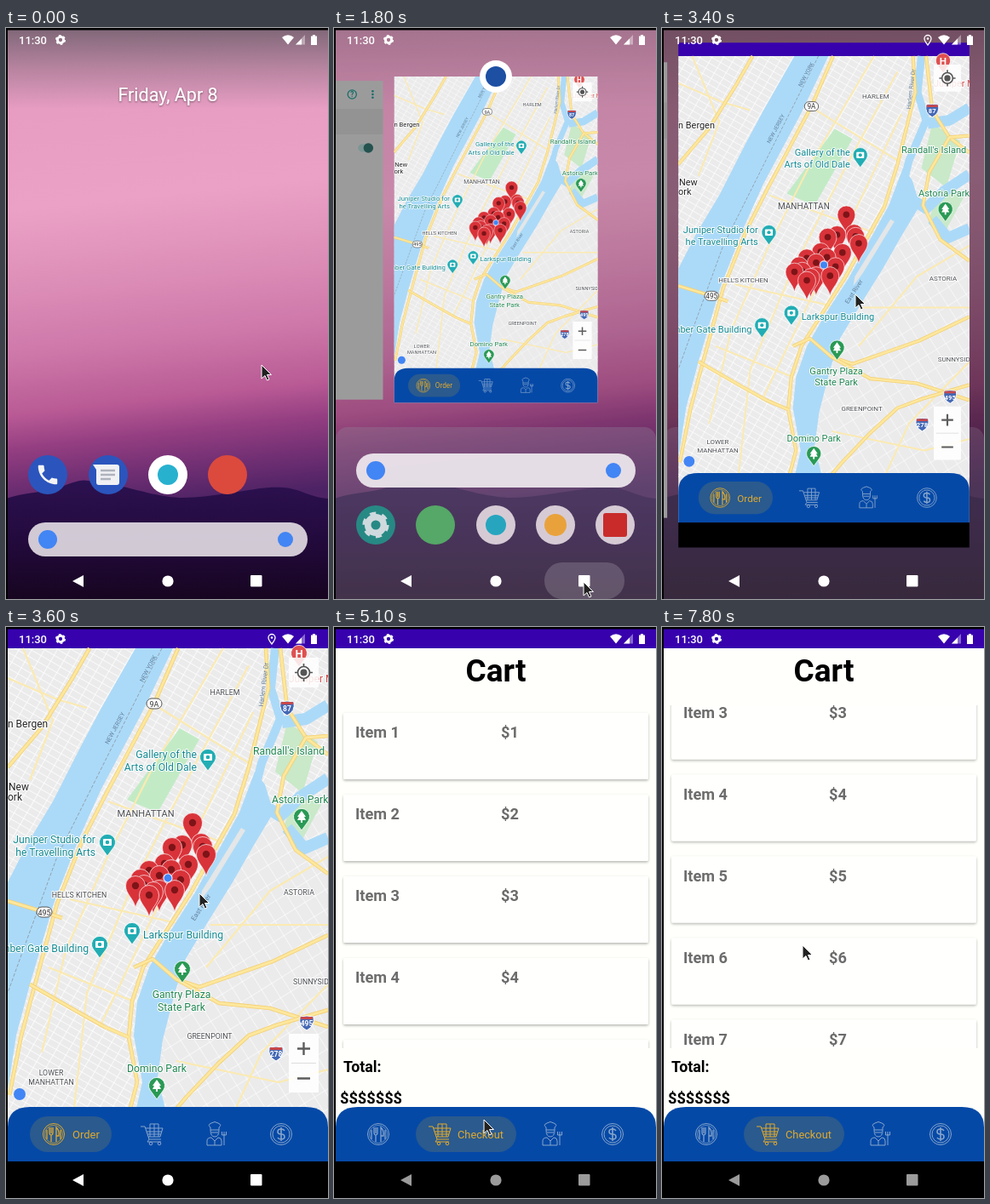
An HTML page for the animation above (8 s loop, 378 by 671 pixels).

```html
<!DOCTYPE html>
<html lang="en">
<head>
<meta charset="utf-8">
<title>Phone demo</title>
<style>
html, body { margin: 0; width: 100%; height: 100%; overflow: hidden; background: #000; }
svg { display: block; width: 100vw; height: 100vh; }
text { font-family: Roboto, sans-serif; }
.b { font-weight: 700; }
.halo text { paint-order: stroke; stroke: #fff; stroke-width: 2px; stroke-linejoin: round; }
</style>
</head>
<body>
<svg id="stage" viewBox="0 0 378 671" xmlns="http://www.w3.org/2000/svg"></svg>
<script>
const LOOP = 8000, STEP = 100;
const GOLD = '#e0a92e', PALE = '#86a5cb';

const rect = (x, y, w, h, fill, r = 0, more = '') =>
  `<rect x="${x}" y="${y}" width="${w}" height="${h}" rx="${r}" fill="${fill}" ${more}/>`;
const circle = (x, y, r, fill, more = '') =>
  `<circle cx="${x}" cy="${y}" r="${r}" fill="${fill}" ${more}/>`;
const path = (d, fill, more = '') => `<path d="${d}" fill="${fill}" ${more}/>`;
const line = (d, color, w, more = '') =>
  path(d, 'none', `stroke="${color}" stroke-width="${w}" stroke-linejoin="round" ${more}`);
const text = (x, y, s, size, fill, more = '') =>
  `<text x="${x}" y="${y}" font-size="${size}" fill="${fill}" ${more}>${s}</text>`;
const group = (id, body, more = '') => `<g id="${id}" ${more}>${body}</g>`;
const mid = 'text-anchor="middle"', end = 'text-anchor="end"';

const gear = (x, y, r, c) =>
  circle(x, y, r * .62, 'none', `stroke="${c}" stroke-width="${r * .5}"`) +
  circle(x, y, r * .9, 'none', `stroke="${c}" stroke-width="${r * .28}" stroke-dasharray="${r * .47}"`);

// Home screen
const phone = 'M6.6 10.8c1.4 2.8 3.8 5.1 6.6 6.6l2.2-2.2c.3-.3.7-.4 1-.2 1.1.4 2.3.6 3.6.6.6 0 1 .4 1 1V20c0 .6-.4 1-1 1C10.6 21 3 13.4 3 4c0-.6.4-1 1-1h3.5c.6 0 1 .4 1 1 0 1.2.2 2.4.6 3.6.1.3 0 .7-.3 1z';
const wallpaper = rect(0, 0, 378, 671, 'url(#sky)') +
  path('M0 553C20 546 45 546 65 539S90 529 103 534S130 537 142 540S185 552 208 552S250 548 272 545S305 539 325 540S355 551 378 553V671H0Z', 'url(#hill)') +
  rect(0, 0, 378, 95, 'url(#scrimFill)', 0, 'id="scrim"');
const dockIcons =
  circle(49, 525, 23, '#2b55bd') +
  path(phone, '#f4f4f6', 'transform="translate(34 510) scale(1.25)"') +
  circle(120, 525, 23, '#2b55bd') +
  path('M102 513H130Q133 513 133 516V534Q133 537 130 537H109Q106 537 106 534V519Z', '#f1f1f4') +
  line('M111 520H128M111 525H128M111 530H123', '#aeb2bd', 2.6) +
  circle(190, 525, 23, '#fff') + circle(190, 525, 12, '#27b1cf') +
  circle(260, 525, 23, '#db4a3d');
const searchBar = rect(26, 581, 328, 40, '#eee9ee', 20, 'id="searchFill"') +
  circle(49, 601, 11, '#4285f4') + circle(328, 601, 9, '#4285f4');
const appRow =
  circle(49, 584, 23, '#278984') + gear(49, 584, 15, '#cfdade') +
  circle(119, 584, 23, '#55a867') +
  circle(190, 584, 23, '#d6cbd5') + circle(190, 584, 12, '#27a5bf') +
  circle(260, 584, 23, '#d6cbd5') + circle(260, 584, 13, '#e9a23b') +
  circle(330, 584, 23, '#d6cbd5') + rect(316, 570, 28, 28, '#c92b2b', 3);

// Neighbouring task, drawn to the left of its own right edge
const settings = rect(-376, 8, 376, 589, '#9c9b9c') +
  rect(-376, 60, 376, 47, '#949394') +
  circle(-57, 33, 8, 'none', 'stroke="#176d68" stroke-width="2"') +
  text(-57, 38, '?', 13, '#176d68', mid + ' class="b"') +
  [27, 33, 39].map(y => circle(-19, y, 2, '#176d68')).join('') +
  rect(-46, 125, 25, 14, '#7b9694', 7) + circle(-27, 132, 9, '#24524f');

// Map
const hudson = 'M152 25L112 95L88 140L55 205L25 255L2 300V545L12 480L28 420L56 325L85 250L112 190L160 100L196 25Z';
const east = 'M292 170L274 218L248 265L222 312L190 362L168 400L154 440L150 480L160 535L152 570H188L178 530L184 485L198 430L211 390L238 345L266 300L290 258L314 218L304 185Z';
const queens = 'M314 218L238 345L198 430L184 485L188 570H378V190Z';
const highways = [
  'M202 25L174 90L118 195L90 250L60 325L34 420L18 480L4 550',
  'M305 25L308 72L285 165L268 220L243 265L217 312L185 362L161 400L148 440L144 482L154 535L146 565',
  'M150 400L172 390L200 414L227 423L270 408L313 393L378 362',
  'M200 414L250 442L310 448L378 470',
  'M200 566L212 552L250 512L285 480L317 468L378 450',
  'M322 25L330 95L352 130L378 150',
  'M378 128L352 130L326 175L318 218L340 262L378 290',
  'M2 322L45 335L66 342',
  'M2 165L42 118L78 60L98 25',
  'M28 420L82 451L116 470L144 482'
];
const streets = [
  'M255 25L175 160L120 268L70 380L42 500', 'M285 45L220 165L150 300L95 430L80 565',
  'M290 100L235 215L170 345L110 470', 'M180 95L285 160', 'M120 205L260 255',
  'M75 320L210 350', 'M50 400L150 440', 'M240 350L378 350', 'M235 400L310 310L378 270',
  'M270 565L300 500L378 420', 'M2 60L60 85L95 95', 'M20 25L55 110L28 180', 'M200 510L320 535L378 520'
];
const marker = (x, y, c, glyph) =>
  path(`M${x} ${y + 16}L${x - 8} ${y + 5}A9.5 9.5 0 1 1 ${x + 8} ${y + 5}Z`, c, 'stroke="#fff" stroke-width=".8"') + glyph;
const tree = (x, y) => marker(x, y, '#2a9a55',
  path(`M${x} ${y - 7}L${x + 5} ${y}H${x + 3}L${x + 5} ${y + 4}H${x - 5}L${x - 3} ${y}H${x - 5}Z`, '#fff') + rect(x - 1, y + 3, 2, 4, '#fff'));
const camera = (x, y) => marker(x, y, '#22adb4',
  rect(x - 5, y - 4, 10, 8, '#fff', 1) + circle(x, y, 2.3, '#22adb4'));
const pin = ([x, y]) =>
  path(`M${x} ${y + 26}C${x - 2} ${y + 15} ${x - 11.5} ${y + 10} ${x - 11.5} ${y}A11.5 11.5 0 0 1 ${x + 11.5} ${y}C${x + 11.5} ${y + 10} ${x + 2} ${y + 15} ${x} ${y + 26}Z`,
    '#d9333a', 'stroke="#fff" stroke-opacity=".75" stroke-width=".9"') + circle(x, y, 4.2, '#7d1418');
const pins = [[219, 230], [229, 254], [207, 256], [195, 259], [231, 258], [235, 267], [214, 279], [186, 278], [194, 285],
  [168, 286], [180, 292], [158, 296], [205, 297], [162, 303], [152, 304], [180, 309], [198, 309], [173, 311], [168, 315]];
const shield = (x, y, n) =>
  path(`M${x - 8} ${y - 7}Q${x} ${y - 9} ${x + 8} ${y - 7}Q${x + 10} ${y + 4} ${x} ${y + 9}Q${x - 10} ${y + 4} ${x - 8} ${y - 7}Z`, '#4468b5', 'stroke="#fff"') +
  rect(x - 7, y - 7, 14, 3, '#c9474a') + text(x, y + 4, n, 8.5, '#fff', mid + ' class="b"');
const oval = (x, y, n) => rect(x - 9, y - 6, 18, 12, '#fff', 6, 'stroke="#555"') + text(x, y + 3.5, n, 9, '#333', mid);
const tag = (rows, color) => rows.map(([x, y, s, size, more = '']) => text(x, y, s, size, color, more)).join('');
const turn = (x, y, a) => `${mid} transform="rotate(${a} ${x} ${y})"`;

const map = rect(2, 25, 376, 603, '#ebebec') + rect(2, 25, 376, 545, 'url(#blocks)') +
  path(queens, '#ebebec') + path(queens, 'url(#blocks2)') +
  path('M204 119L227 132L178 218L142 203Z', '#c2ebc5') +
  path('M340 195L372 205L345 255L325 238ZM330 112L366 135L348 195L316 170Z', '#c9e9c9') +
  streets.map(d => line(d, '#fbeab1', 2.2)).join('') +
  path(hudson, '#abdaf8') + path(east, '#abdaf8') +
  line('M316 25L311 72L322 108L300 160L290 200', '#abdaf8', 10) +
  line('M288 200L322 222L345 200L378 178', '#abdaf8', 14) +
  line('M378 92L352 108L324 112M378 248L350 260L330 236', '#abdaf8', 14) +
  path('M276 236L281 239L240 306L228 322L230 310Z', '#e4e6e7') +
  highways.map(d => line(d, '#f3cf72', 4.6) + line(d, '#fde79d', 3)).join('') +
  line('M183 25L120 150L60 270L20 380L2 430', '#8e9aa5', .9, 'stroke-dasharray="4 2"') +
  oval(174, 90, '9A') + oval(45, 335, '495') +
  shield(330, 95, '87') + shield(353, 465, '495') + shield(317, 501, '278') +
  group('labels',
    tag([[224, 154, 'Gallery of the', 12.2, end], [224, 169, 'Arts of Old Dale', 12.2, end],
      [105, 254, 'Juniper Studio for', 12.2, end], [105, 269, 'he Travelling Arts', 12.2, end],
      [161, 366, 'Larkspur Building', 12.2], [97, 382, 'mber Gate Building', 12.2, end]], '#128991') +
    tag([[206, 436, 'Gantry Plaza', 12.2, mid], [206, 451, 'State Park', 12.2, mid], [177, 523, 'Domino Park', 12.2, mid],
      [290, 150, "Randall's Island", 12.2], [312, 207, 'Astoria Park', 12.2]], '#1f8550') +
    tag([[164, 223, 'MANHATTAN', 11, mid], [257, 80, 'HARLEM', 8.8, mid], [344, 315, 'ASTORIA', 8.8, mid],
      [337, 420, 'SUNNYSIDE', 8.8], [239, 484, 'GREENPOINT', 8.8, mid], [86, 318, "HELL'S KITCHEN", 8.8, mid],
      [53, 527, 'LOWER', 8.8, mid], [53, 538, 'MANHATTAN', 8.8, mid]], '#4a4c50') +
    tag([[2, 118, 'n Bergen', 12], [3, 192, 'New', 12], [2, 204, 'ork', 12]], '#222') +
    tag([[332, 65, 'Juniper M', 12]], '#cf4848'), 'class="halo"') +
  tag([[169, 50, 'NEW YORK', 7, turn(169, 50, -62)], [130, 120, 'NEW JERSEY', 7, turn(130, 120, -62)],
    [305, 68, 'Harlem River Dr', 7.5, turn(305, 68, -83)], [231, 331, 'East River', 8, turn(231, 331, -57)]], '#627f9b') +
  marker(344, 31, '#df5050', text(344, 36, 'H', 13, '#fff', mid + ' class="b"')) +
  camera(119, 253) + camera(237, 153) + camera(148, 357) + camera(110, 373) +
  tree(207, 402) + tree(177, 539) + tree(347, 223) +
  pins.map(pin).join('') + circle(190, 295, 5, '#4285f4', 'stroke="#dfeaff" stroke-width="1.2"') +
  circle(16, 549, 7, '#4285f4') +
  rect(332, 36, 35, 35, '#fff', 1, 'opacity=".85"') +
  circle(349.5, 53.5, 7, 'none', 'stroke="#555" stroke-width="1.7"') + circle(349.5, 53.5, 4, '#555') +
  line('M349.5 43V47M349.5 60V64M339 53.5H343M356 53.5H360', '#555', 1.7) +
  rect(332, 478, 35, 69, '#fff', 1, 'opacity=".9"') + line('M335 512.5H364', '#ddd', 1) +
  line('M342 495.5H357M349.5 488V503M342 530.5H357', '#5c5c5c', 2.4);

// Cart page
const card = n => {
  const y = 101 + (n - 1) * 96;
  return rect(11, y, 358, 78, '#fffffd', 2, 'filter="url(#lift)"') +
    text(25, y + 29, 'Item ' + n, 18.2, '#6c6c6c', 'class="b"') + text(196, y + 29, '$' + n, 18.2, '#6c6c6c', 'class="b"');
};
const cart = rect(2, 25, 376, 603, '#fffffb') +
  text(190, 64, 'Cart', 37, '#000', mid + ' class="b"') +
  `<g clip-path="url(#listClip)">${group('list', [1, 2, 3, 4, 5, 6, 7, 8].map(card).join(''))}</g>` +
  text(11, 523, 'Total:', 17.8, '#000', 'class="b"') +
  `<g clip-path="url(#sumClip)">${text(7, 560, '$$$$$$$', 18.2, '#000', 'class="b"')}</g>`;

// Tab icons, centred on the origin
const icons = [
  circle(0, 0, 12.5, 'none') + circle(0, 0, 10.5, 'none', 'stroke-width=".7"') +
    path('M-5 -8V-2Q-5 1 -3 1V9M-1 -8V-2Q-1 1 -3 1M-3 -8V-1M3 9V-8Q7 -4 6 2H3M8 -5V6M-8 -5V6', 'none', 'stroke-width="1.3"'),
  path('M-14 -9H-9L-4 6H10M-8 -7H12L9 3H-5M-7 -3H11M-6 0H10M-3 -12V3M2 -12V3M7 -12V3M-3 -12H7M-4 6L-6 9H10', 'none') +
    circle(-2, 11, 1.8, 'none') + circle(8, 11, 1.8, 'none'),
  path('M-7 -5V-8Q-11 -11 -6 -13Q-2 -16 2 -13Q7 -11 3 -8V-5ZM-7 -5Q-7 3 -2 3Q3 3 3 -5M-6 -2H2M-11 13V8Q-11 4 -6 4L-2 8L2 4Q6 4 6 8V13ZM-2 8V13M9 13V0M6.5 -3V1H11.5V-3M9 -3V1', 'none'),
  circle(0, 0, 12.5, 'none') + circle(0, 0, 10, 'none') +
    path('M4 -4Q3 -6 0 -6Q-4 -6 -4 -3Q-4 0 0 0Q4 0 4 3Q4 6 0 6Q-3 6 -4 4M0 -8V8', 'none', 'stroke-width="1.6"')
];
const tabs = path('M2 628V588Q2 564 28 564H352Q378 564 378 588V628Z', '#0549a7') +
  group('orderPill', rect(28, 575, 96, 42, '#2a5a8e', 21) + text(78, 601, 'Order', 13, GOLD)) +
  group('checkPill', rect(96, 575, 118, 42, '#2a5a8e', 21) + text(145, 601, 'Checkout', 12.8, GOLD)) +
  icons.map((d, i) => group('tab' + i, d, 'stroke-width="1"')).join('');

const task = group('taskBody',
  rect(2, 2, 376, 23, '#3702ad') + group('map', map) + group('cart', cart) + tabs + rect(2, 628, 376, 43, '#000'),
  'clip-path="url(#taskClip)"');

const status = text(15, 19, '11:30', 13, '#fff', 'font-weight="500"') + gear(64, 14, 5.8, '#fff') +
  group('gps', path('M312 20Q308 15 308 12.5A4 4 0 0 1 316 12.5Q316 15 312 20Z', 'none', 'stroke="#fff" stroke-width="1.3"') + circle(312, 12.5, 1.3, '#fff')) +
  path('M324 11Q331 5.5 338 11L331 19.5Z', '#fff') +
  path('M351 8V19.5H340Z', '#fff', 'opacity=".4"') + path('M347 12.5V19.5H340Z', '#fff') +
  path('M358 9.5H360V8H363V9.5H365V20H358Z', '#fff');
const keys = path('M78 650L91 643V657Z', 'inherit') + circle(190, 650, 6.6, 'inherit') + rect(287, 643, 13.5, 13.5, 'inherit', 1);

const stops = list => list.map(([o, c, a = 1]) => `<stop offset="${o}" stop-color="${c}" stop-opacity="${a}"/>`).join('');
const blocks = (id, angle, w, h, alpha) =>
  `<pattern id="${id}" width="${w}" height="${h}" patternUnits="userSpaceOnUse" patternTransform="rotate(${angle})">${line(`M0 .5H${w}M.5 0V${h}`, '#fff', 1, `opacity="${alpha}"`)}</pattern>`;
const clip = (id, x, y, w, h) => `<clipPath id="${id}"><rect x="${x}" y="${y}" width="${w}" height="${h}"/></clipPath>`;

document.getElementById('stage').innerHTML = `<defs>
  <linearGradient id="sky" gradientUnits="userSpaceOnUse" x1="165" y1="0" x2="225" y2="555">${stops([[0, '#e49abf'], [.35, '#eba1c6'], [.52, '#dc8db7'], [.66, '#cd77a9'], [.78, '#b95a95'], [.85, '#953f82'], [.92, '#743074'], [1, '#4e2365']])}</linearGradient>
  <linearGradient id="hill" x2="0" y2="1">${stops([[0, '#2c1150'], [.5, '#230a3d'], [1, '#170520']])}</linearGradient>
  <linearGradient id="scrimFill" x2="0" y2="1">${stops([[0, '#4b4d53', .66], [.5, '#4b4d53', .3], [1, '#4b4d53', 0]])}</linearGradient>
  <filter id="lift" x="-5%" y="-15%" width="110%" height="140%"><feDropShadow dx="0" dy="1.5" stdDeviation="1.8" flood-opacity=".3"/></filter>
  <filter id="soft"><feDropShadow dx="0" dy="1" stdDeviation="1.3" flood-opacity=".5"/></filter>
  ${blocks('blocks', 30, 13, 8, .75)}${blocks('blocks2', -32, 14, 20, .6)}
  ${clip('listClip', 2, 92, 376, 403)}${clip('sumClip', 2, 535, 376, 25)}${clip('taskClip', 2, 25, 376, 603)}
</defs>` +
  wallpaper + rect(0, 0, 378, 671, '#1a1018', 0, 'id="dim"') +
  group('date', text(190, 86, 'Friday, Apr 8', 21.5, '#fff', mid), 'filter="url(#soft)"') +
  group('dock', dockIcons) +
  group('sheet', rect(2, 469, 376, 230, '#8d7f95', 14, 'opacity=".36"')) +
  group('search', searchBar) + group('apps', appRow) +
  group('recents', group('settings', settings) + group('task', task) +
    group('badge', circle(190, 57, 19, '#fff') + circle(190, 57, 12, '#1d4fa3'))) +
  rect(247, 628, 94, 43, '#fff', 21, 'id="ripple"') +
  status + group('keys', keys) +
  group('cursor', path('M0 0V16L4 12.5L6.5 18L9 17L6.5 11.5H11.5Z', '#222', 'stroke="#fff" stroke-width="1"')) +
  rect(0, 0, 2, 671, '#000') + rect(0, 0, 378, 2.5, '#000');

const el = {};
document.querySelectorAll('#stage [id]').forEach(n => el[n.id] = n);
const set = (id, attrs) => { for (const k in attrs) el[id].setAttribute(k, attrs[k]); };
const fade = (id, a) => set(id, { opacity: Math.max(0, Math.min(1, a)) });
const show = (id, on) => set(id, { display: on ? 'inline' : 'none' });
const move = (id, x, y, s = 1) => set(id, { transform: `translate(${x} ${y}) scale(${s})` });
const mix = (a, b, k) => a + (b - a) * k;
const span = (t, a, b) => Math.max(0, Math.min(1, (t - a) / (b - a)));
const easeOut = u => 1 - (1 - u) ** 2;

// Rows are [time, value, value...]
function track(rows, t) {
  let i = 0;
  while (i < rows.length - 2 && rows[i + 1][0] <= t) i++;
  const [a, b] = [rows[i], rows[i + 1]], k = span(t, a[0], b[0]);
  return a.slice(1).map((v, j) => mix(v, b[j + 1], k));
}
const pointer = [[0, 300, 396], [600, 300, 396], [700, 325, 430], [800, 364, 500], [900, 345, 585], [1000, 283, 636],
  [1200, 283, 636], [1300, 293, 651], [2100, 293, 651], [2300, 226, 380], [2500, 226, 380], [2600, 251, 350],
  [2900, 227, 313], [4100, 227, 313], [4400, 176, 579], [5700, 176, 579], [5800, 329, 566], [5900, 329, 566],
  [6000, 189, 441], [6500, 189, 441], [6800, 190, 396], [7000, 186, 330], [7200, 172, 360], [7400, 166, 412],
  [7500, 166, 412], [7800, 165, 374]];
const scroll = [[6500, 0], [6600, 8], [6800, 40], [7000, 110], [7200, 160], [7400, 178], [7500, 178], [7800, 215.5]];

function draw(t) {
  const q = easeOut(span(t, 1200, 1800));
  const p = easeOut(span(t, 3200, 3600));
  const k = easeOut(span(t, 4800, 5100));
  const inCart = t >= 5100;

  fade('scrim', 1 - .65 * q);
  fade('dim', q * .17 + p * .4);
  fade('date', 1 - 2 * q);
  fade('dock', 1 - 2 * q);
  move('dock', 0, -60 * q);
  move('sheet', 0, 202 * (1 - q));
  fade('sheet', 1 - .35 * p);
  move('search', 0, -81 * q);
  set('searchFill', { opacity: mix(.86, .93, q) });
  fade('search', 1 - 2 * p);
  move('apps', 0, 90 * (1 - q));
  fade('apps', q * (1 - 2 * p));

  const x = mix(70.5, 2, p), y = mix(57, 25, p), s = mix(.636, 1, p);
  show('recents', q > 0);
  fade('recents', q);
  move('recents', 0, 40 * (1 - q));
  move('settings', x - 13, y, s);
  move('task', x - 2 * s, y - 25 * s, s);
  const box = el.taskClip.firstElementChild;
  box.setAttribute('y', 25 - 23 * p);
  box.setAttribute('height', 603 + 66 * p);
  fade('badge', 1 - 2 * p);

  fade('ripple', .17 * span(t, 1200, 1400) * (1 - span(t, 1800, 2000)));
  show('gps', t >= 3300 && t < 4900);
  const level = Math.round(mix(255, 155, span(t, 4100, 5100)));
  set('keys', { fill: `rgb(${level},${level},${level})` });

  show('map', !inCart);
  show('cart', inCart);
  fade('orderPill', 1 - k);
  fade('checkPill', k);
  [[56, 52], [172, 125], [247, 256], [323, 327]].forEach(([a, b], i) => {
    move('tab' + i, mix(a, b, k), 596);
    set('tab' + i, { stroke: i === (k > .5 ? 1 : 0) ? GOLD : PALE });
  });
  move('list', 0, -track(scroll, t)[0]);
  move('cursor', ...track(pointer, t));
}

const start = performance.now();
function tick() {
  const t = (performance.now() - start) % LOOP;
  draw(Math.floor(t / STEP) * STEP);
  requestAnimationFrame(tick);
}
tick();
</script>
</body>
</html>
```
